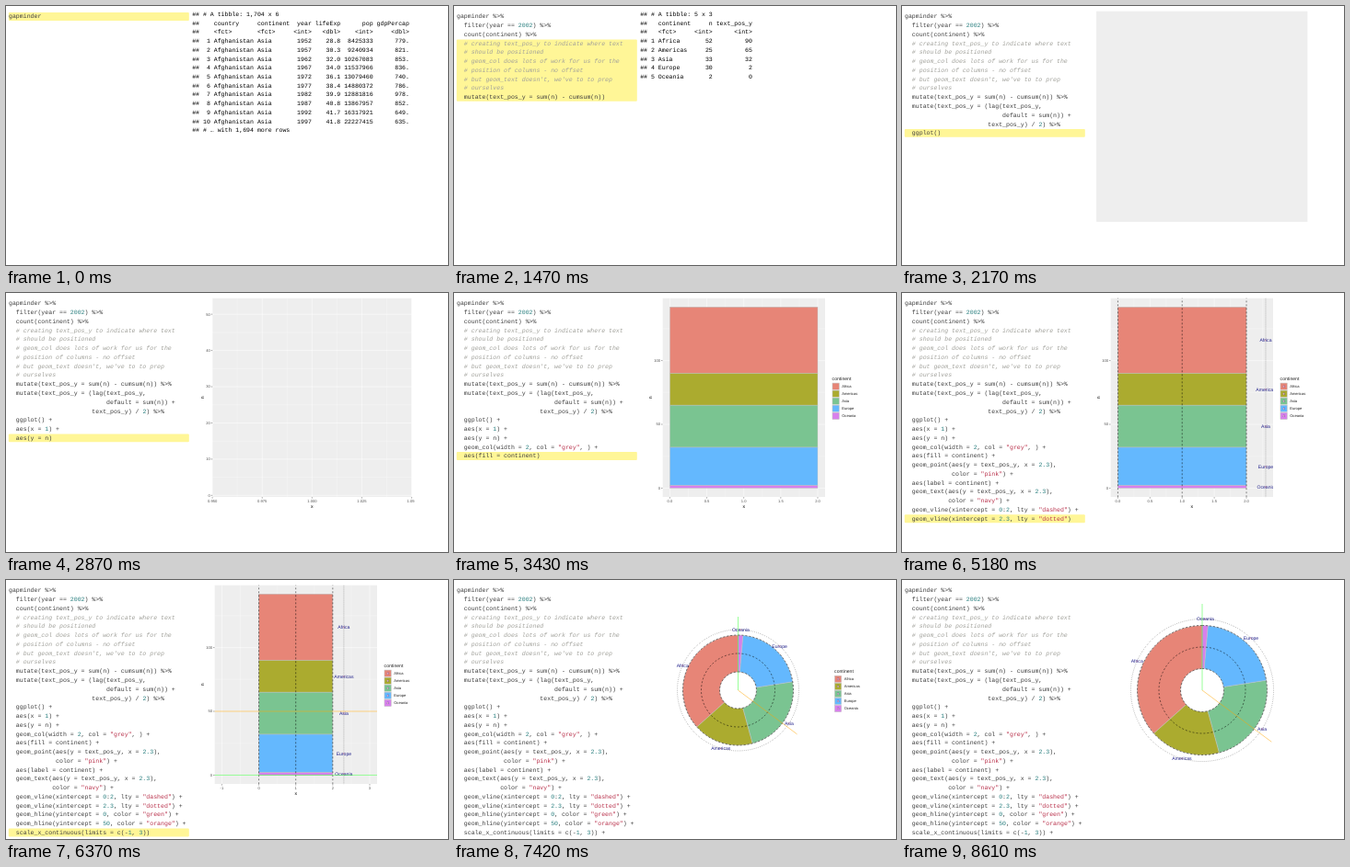
An HTML page for the animation above (9660 ms loop, 480 by 282 pixels).

```html
<!DOCTYPE html>
<html lang="en">
<head>
<meta charset="utf-8">
<title>Building a donut chart</title>
<style>
html, body { margin: 0; width: 100%; height: 100%; overflow: hidden; background: #fff; }
svg { display: block; width: 480px; height: 282px; }
text { white-space: pre; text-rendering: geometricPrecision; font-family: "Liberation Sans", Arial, sans-serif; }
.mono { font: 6.55px "Liberation Mono", "Courier New", monospace; }
.code { fill: #3c3c3c; }
.note { fill: #a0a09a; font-style: italic; }
.str { fill: #b8304a; }
.num { fill: #2a7f7f; }
.mark { filter: blur(.6px); }
</style>
</head>
<body>
<svg id="stage" viewBox="0 0 480 282"></svg>
<script>
const LOOP = 9660;

// [start in ms, code added at this step]
const steps = [
  [0, 'gapminder'],
  [840, '  filter(year == 2002)'],
  [1260, '  count(continent)'],
  [1470, `  # creating text_pos_y to indicate where text
  # should be positioned
  # geom_col does lots of work for us for the
  # position of columns - no offset
  # but geom_text doesn't, we've to to prep
  # ourselves
  mutate(text_pos_y = sum(n) - cumsum(n))`],
  [1820, `  mutate(text_pos_y = (lag(text_pos_y,
                           default = sum(n)) +
                       text_pos_y) / 2)`],
  [2170, '  ggplot()'],
  [2450, '  aes(x = 1)'],
  [2870, '  aes(y = n)'],
  [3080, '  geom_col(width = 2, col = "grey", )'],
  [3430, '  aes(fill = continent)'],
  [3780, '  geom_point(aes(y = text_pos_y, x = 2.3),\n             color = "pink")'],
  [4130, '  aes(label = continent)'],
  [4480, '  geom_text(aes(y = text_pos_y, x = 2.3),\n            color = "navy")'],
  [4830, '  geom_vline(xintercept = 0:2, lty = "dashed")'],
  [5180, '  geom_vline(xintercept = 2.3, lty = "dotted")'],
  [5600, '  geom_hline(yintercept = 0, color = "green")'],
  [5950, '  geom_hline(yintercept = 50, color = "orange")'],
  [6370, '  scale_x_continuous(limits = c(-1, 3))'],
  [6720, '  coord_polar(theta = "y")'],
  [7070, '  scale_y_continuous()'],
  [7420, '  theme_void()'],
  [7770, '  theme(legend.position = "none")']
];
const [GGPLOT, AES_X, AES_Y, COL, FILL, POINT, , TEXT, DASH, DOT, GREEN, ORANGE, LIMITS, POLAR, , VOID, BARE] =
  steps.map((s, i) => i).slice(5);

const names = ['Africa', 'Americas', 'Asia', 'Europe', 'Oceania'];
const counts = [52, 25, 33, 30, 2];
const below = [90, 65, 32, 2, 0];
const mids = below.map((b, i) => b + counts[i] / 2);
const fills = ['#e78577', '#abab2f', '#7ac491', '#64b8fe', '#d880ec'];
const TOTAL = 142, LINE = 0.5, SMALL = 4.09, BIG = 5.11;
const PANEL = '#eee', EDGE = '#bebebe', NAVY = '#22228c';

const escape = s => s.replace(/&/g, '&amp;').replace(/</g, '&lt;').replace(/>/g, '&gt;');
const text = (x, y, s, size, fill, anchor = 'start', more = '') =>
  `<text x="${x}" y="${y}" font-size="${size}" fill="${fill}" text-anchor="${anchor}" ${more}>${s}</text>`;
const rect = (x, y, w, h, fill, more = '') =>
  `<rect x="${x}" y="${y}" width="${w}" height="${h}" fill="${fill}" ${more}/>`;
const path = (d, stroke, width = LINE, dash = '', fill = 'none') =>
  `<path d="${d}" stroke="${stroke}" stroke-width="${width}" stroke-dasharray="${dash}" fill="${fill}"/>`;
const clip = (id, x, y, w, h, content) =>
  `<clipPath id="${id}">${rect(x, y, w, h, '#000')}</clipPath><g clip-path="url(#${id})">${content}</g>`;

// ---- code column ----
function code(n) {
  const lines = [];
  let first = 0;
  for (let i = 0; i <= n; i++) {
    first = lines.length;
    lines.push(...steps[i][1].split('\n'));
    if (i < n) lines[lines.length - 1] += i < GGPLOT ? ' %>%' : ' +';
  }
  const colour = s => escape(s).replace(/(#.*)|("[^"]*")|(\b\d+(?:\.\d+)?)/g, (m, note, str) =>
    `<tspan class="${note ? 'note' : str ? 'str' : 'num'}">${m}</tspan>`);
  return rect(2.8, 7.1 + 9.76 * first, 196, 9.76 * (lines.length - first) - 0.9, '#fff697', 'rx="1" class="mark"') +
    lines.map((s, i) => `<text class="mono code" x="3" y="${13.4 + 9.76 * i}">${colour(s)}</text>`).join('');
}

// ---- printed tables; negative widths are left-aligned ----
const row = (cells, widths) => '## ' + cells.map((c, i) =>
  widths[i] < 0 ? String(c).padEnd(-widths[i]) : String(c).padStart(widths[i])).join(' ');

function table(n) {
  let size, widths, rows, more;
  if (n < 2) {
    size = n ? '142 x 6' : '1,704 x 6';
    more = n ? '132' : '1,694';
    widths = [2, -11, -9, 5, 7, n ? 9 : 8, 9];
    const data = n ? `Afghanistan Asia 42.1 25268405 727.
Albania Europe 75.7 3508512 4604.
Algeria Africa 71.0 31287142 5288.
Angola Africa 41.0 10866106 2773.
Argentina Americas 74.3 38331121 8798.
Australia Oceania 80.4 19546792 30688.
Austria Europe 79.0 8148312 32418.
Bahrain Asia 74.8 656397 23404.
Bangladesh Asia 62.0 135656790 1136.
Belgium Europe 78.3 10311970 30486.` : `28.8 8425333 779.
30.3 9240934 821.
32.0 10267083 853.
34.0 11537966 836.
36.1 13079460 740.
38.4 14880372 786.
39.9 12881816 978.
40.8 13867957 852.
41.7 16317921 649.
41.8 22227415 635.`;
    rows = data.split('\n').map((s, i) => {
      const c = s.split(' ');
      const start = n ? [c.shift(), c.shift(), 2002] : ['Afghanistan', 'Asia', 1952 + 5 * i];
      return [i + 1, ...start, ...c];
    });
    rows.unshift(['', 'country', 'continent', 'year', 'lifeExp', 'pop', 'gdpPercap'],
      ['', '<fct>', '<fct>', '<int>', '<dbl>', '<int>', '<dbl>']);
  } else {
    const pos = n < 4 ? below : ['116  ', '77.5', '48.5', '17  ', '1  '];
    size = n < 3 ? '5 x 2' : '5 x 3';
    widths = [1, -9, 5, 10];
    rows = names.map((name, i) => [i + 1, name, counts[i], pos[i]]);
    rows.unshift(['', 'continent', 'n', 'text_pos_y'], ['', '<fct>', '<int>', n < 4 ? '<int>' : '<dbl>']);
    if (n < 3) rows = rows.map(r => r.slice(0, 3));
  }
  const lines = ['## # A tibble: ' + size, ...rows.map(r => row(r, widths))];
  if (more) lines.push(`## # … with ${more} more rows`);
  return lines.map((s, i) =>
    `<text class="mono" x="202.2" y="${10.9 + 9.72 * i}">${escape(s)}</text>`).join('');
}

// ---- plots ----
function legend(n, dx, dy) {
  const x = 410.6 + dx;
  let s = text(x, 95 + dy, 'continent', BIG, '#222');
  names.forEach((name, i) => {
    const y = 97.7 + dy + 8.03 * i;
    if (n < VOID) s += rect(x, y, 8.03, 8.03, '#f2f2f2');
    s += rect(x + 0.4, y + 0.4, 7.2, 7.2, fills[i], `stroke="${EDGE}" stroke-width=".5"`);
    if (n >= POINT) s += `<circle cx="${x + 4}" cy="${y + 4}" r=".9" fill="pink"/>`;
    if (n >= TEXT) s += text(x + 4, y + 5.5, 'a', BIG, NAVY, 'middle', 'opacity=".45"');
    s += text(x + 10.6, y + 5.5, name, SMALL, '#222');
  });
  return s;
}

// calls fn(value, isMajor) for every grid line inside a range
function grid(lo, hi, step, fn) {
  const half = step / 2;
  for (let k = Math.ceil(lo / half - 1e-6); k <= hi / half + 1e-6; k++) fn(k * half, k % 2 === 0);
}

// points and labels shared by both coordinate systems
function marks(n, at) {
  let s = '';
  mids.forEach((m, i) => {
    const [x, y] = at(2.3, m);
    if (n >= POINT) s += `<circle cx="${x}" cy="${y}" r=".9" fill="pink"/>`;
    if (n >= TEXT) s += text(x, y + 1.83, names[i], BIG, NAVY, 'middle');
  });
  return s;
}

// vertical and horizontal reference lines
function rules(n, vline, hline) {
  let s = '';
  if (n >= DASH) s += [0, 1, 2].map(x => path(vline(x), '#000', LINE, '2 2')).join('');
  if (n >= DOT) s += path(vline(2.3), '#000', LINE, '.5 1.5');
  if (n >= GREEN) s += path(hline(0), '#3f3');
  if (n >= ORANGE) s += path(hline(50), 'orange');
  return s;
}

const sideTitle = (s, y) => text(214.6, y, s, BIG, '#000', 'middle', `transform="rotate(-90 214.6 ${y})"`);

function cartesian(n) {
  const left = n < AES_Y ? 211.05 : n < COL ? 224.1 : 226.4;
  const right = n < FILL ? 440.6 : 403;
  const top = 5.4, bottom = n < AES_X ? 234.95 : 222.3;
  const [x0, x1, xStep, digits] = n < COL ? [0.95, 1.05, 0.025, 3] : n < POINT ? [-0.1, 2.1, 0.5, 1] :
    n < LIMITS ? [-0.115, 2.415, 0.5, 1] : [-1.2, 3.2, 1, 0];
  const [y0, y1, yStep] = n < COL ? [-0.5, 54.5, 10] : [-7.1, 149.1, 50];
  const px = x => left + (x - x0) / (x1 - x0) * (right - left);
  const py = y => bottom - (y - y0) / (y1 - y0) * (bottom - top);
  const vline = x => `M${px(x)} ${bottom}V${top}`;
  const hline = y => `M${left} ${py(y)}H${right}`;

  let axes = '', back = '', body = '';
  if (n >= AES_X) {
    grid(x0, x1, xStep, (x, major) => {
      back += path(vline(x), '#fff', major ? LINE : LINE / 2);
      if (major) axes += path(`M${px(x)} ${bottom}v1.28`, '#333') +
        text(px(x), 227.9, x.toFixed(digits), SMALL, '#4d4d4d', 'middle');
    });
    axes += text((left + right) / 2, 233.5, 'x', BIG, '#000', 'middle');
  }
  if (n >= AES_Y) {
    grid(y0, y1, yStep, (y, major) => {
      back += path(hline(y), '#fff', major ? LINE : LINE / 2);
      if (major) axes += path(`M${left} ${py(y)}h-1.28`, '#333') +
        text(left - 2.3, py(y) + 1.47, y, SMALL, '#4d4d4d', 'end');
    });
    axes += sideTitle('n', (top + bottom) / 2);
  }
  if (n >= COL) below.forEach((b, i) => {
    const y = py(b + counts[i]);
    body += rect(px(0), y, px(2) - px(0), py(b) - y, n < FILL ? '#595959' : fills[i],
      `stroke="${EDGE}" stroke-width=".5"`);
  });
  body += marks(n, (x, y) => [px(x), py(y)]) + rules(n, vline, hline);
  const w = right - left, h = bottom - top;
  return clip('panel', left, top, w, h, rect(left, top, w, h, PANEL) + back + body) + axes +
    (n >= FILL ? legend(n, 0, 0) : '');
}

function polar(n) {
  const [cx, cy, size] = n < VOID ? [313.1, 116.8, 179.8] : n < BARE ? [308.5, 120, 200] : [326, 120, 235];
  const radius = x => (x + 1) / 4 * size * 0.4;
  const spot = (r, y) => {
    const a = y / TOTAL * 2 * Math.PI;
    return [cx + r * Math.sin(a), cy - r * Math.cos(a)];
  };
  const at = (x, y) => spot(radius(x), y);
  const ring = r => `M${cx} ${cy - r}a${r} ${r} 0 0 1 0 ${2 * r}a${r} ${r} 0 0 1 0 ${-2 * r}`;
  const vline = x => ring(radius(x));
  const hline = y => `M${cx} ${cy}L${at(3, y)}`;

  let s = '';
  if (n < VOID) {
    const left = cx - size / 2, top = cy - size / 2, edge = size * 0.45;
    s += rect(left, top, size, size, PANEL);
    grid(0, TOTAL, 50, (y, major) => {
      s += path(`M${cx} ${cy}L${spot(edge, y)}`, '#fff', major ? LINE : LINE / 2);
      if (!major) return;
      const [x, ty] = spot(edge + 4, y);
      s += text(x, ty + 1.47, y, SMALL, '#4d4d4d', 'middle');
    });
    grid(-0.5, 3, 1, (x, major) => {
      s += path(vline(x), '#fff', major ? LINE : LINE / 2);
    });
    s += path(ring(edge), '#fff');
    for (let x = -1; x <= 3; x++) {
      const y = cy - radius(x);
      s += path(`M${left} ${y}h-1.28`, '#333') + text(left - 2.3, y + 1.47, x, SMALL, '#4d4d4d', 'end');
    }
    s += sideTitle('x', cy) + text(cx, top + size + 5, 'n', BIG, '#000', 'middle');
  }
  const outer = radius(2), inner = radius(0);
  below.forEach((b, i) => {
    const e = b + counts[i];
    s += path(`M${at(2, b)}A${outer} ${outer} 0 0 1 ${at(2, e)}L${at(0, e)}` +
      `A${inner} ${inner} 0 0 0 ${at(0, b)}Z`, EDGE, LINE, '', fills[i]);
  });
  s += marks(n, at) + rules(n, vline, hline);
  if (n < BARE) s += legend(n, n < VOID ? 0 : 2.5, cy - 113.85);
  return s;
}

const plot = n => clip('canvas', 208.5, 2.5, 235, 235, n < POLAR ? cartesian(n) : polar(n));

// ---- playback ----
const stage = document.getElementById('stage');
let shown = -1;
function frame() {
  const t = performance.now() % LOOP;
  let n = steps.length - 1;
  while (steps[n][0] > t) n--;
  if (n !== shown) {
    stage.innerHTML = code(n) + (n < GGPLOT ? table(n) : plot(n));
    shown = n;
  }
  requestAnimationFrame(frame);
}
frame();
</script>
</body>
</html>
```
